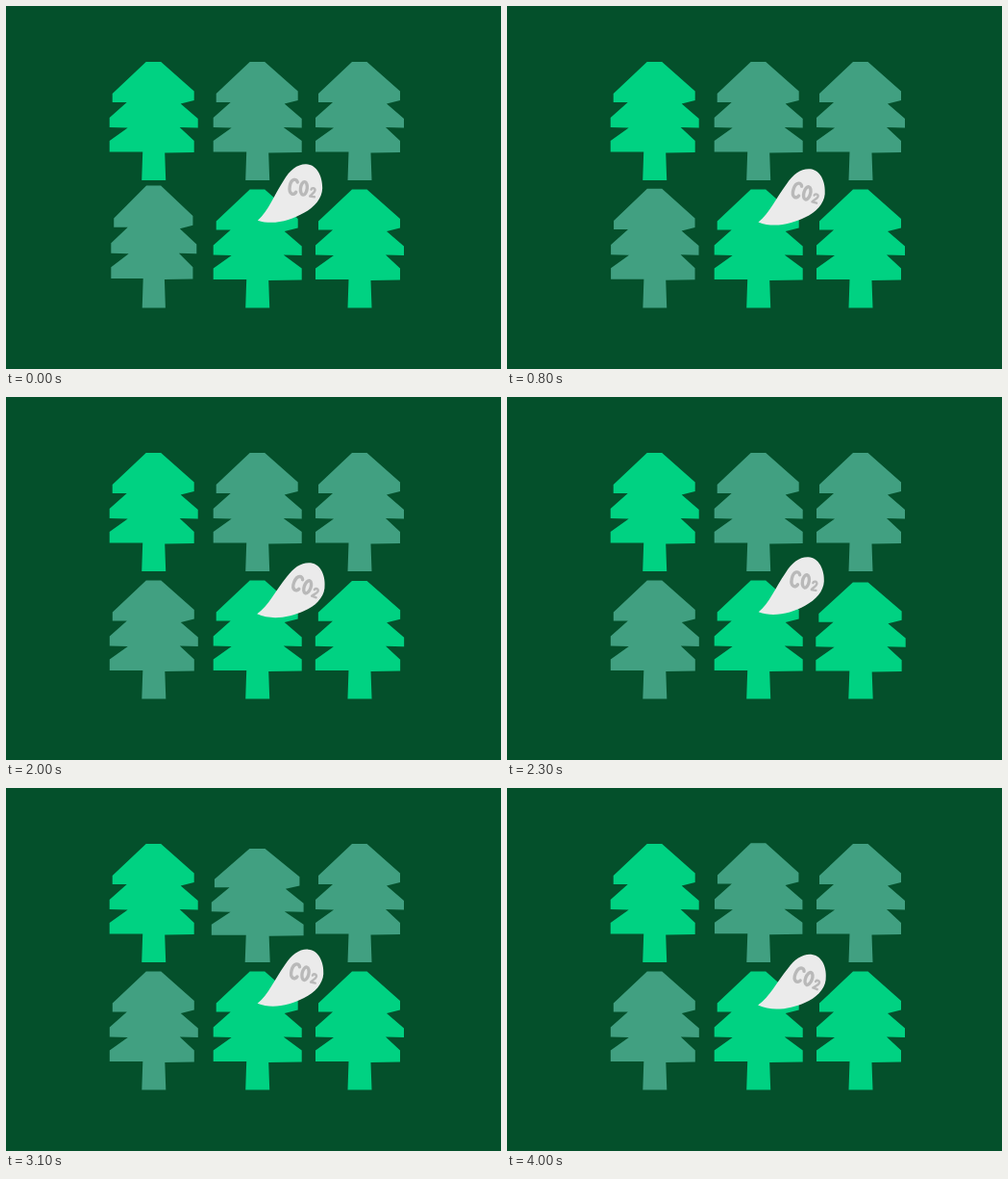
Write an HTML page that moves like this. It is 515 by 377 pixels and loops after 4.1 s.

```html
<!DOCTYPE html>
<html lang="en">
<head>
<meta charset="utf-8">
<title>Trees</title>
<style>
html, body { margin: 0; width: 100%; height: 100%; overflow: hidden; background: #04502b; }
svg { display: block; width: 100vw; height: 100vh; }
</style>
</head>
<body>
<svg viewBox="0 0 515 377">
  <g id="trees"></g>
  <path id="leaf" fill="#ebebeb" d="M262 222C273 212 278 196 288 180C294 169 302 162.5 311 162.5C322 162.5 328.5 175 328.5 187C328.5 197 321 207 310 213C296 221.5 278 227 262 222Z"/>
  <g id="label" role="img" aria-label="CO2" fill="none" stroke="#b9b9b9" stroke-width="3.4" stroke-linecap="round" stroke-linejoin="round">
    <path d="M-7.4-5.4C-8.4-9-14.6-9-14.8 0S-8.8 8.8-7.6 5"/>
    <ellipse rx="3.4" ry="6.8"/>
    <path stroke-width="2.4" d="M7.7 .2C8-2.2 12-2.2 11.8 .6C11.7 2.8 9 4.7 7.4 7.3H12.2"/>
  </g>
</svg>
<script>
const LOOP = 4100, STEP = 100, HEIGHT = 123;
const SWAY = 2400, SWAY_START = 200;
const BRIGHT = '#00d282', MUTED = '#41a081';
const $ = id => document.getElementById(id);

// Tree outline around the middle of its foot; w is the reach of the lowest branch.
const treePath = w => `M-8-123H7.5L42-92.5V-83L28-79.5L46-64V-54.5L27-55L${w}-41V-29L11.5-28.5L12.5 0H-12.5L-11.5-29.5L-46-29.5V-41L-27-54.5L-46-55V-65L-28-81L-43-81V-90Z`;

// x, foot, colour, branch reach, start of the wobble
const trees = [
  [153.7, 181, BRIGHT, 42],
  [261.7, 181, MUTED, 46, 2800],
  [368, 181, MUTED, 42],
  [153.8, 313.5, MUTED, 42, -400],
  [261.7, 313.5, BRIGHT, 46],
  [368, 313.5, BRIGHT, 42, 1200]
].map(([x, y, color, reach, start]) => {
  const el = document.createElementNS('http://www.w3.org/2000/svg', 'path');
  el.setAttribute('d', treePath(reach));
  el.setAttribute('fill', color);
  $('trees').append(el);
  return { el, x, y, start };
});

// Keys are [ms, value]: height gained by a tree, and how far the leaf hangs down
const wobble = [[0, 0], [230, -8], [470, 7], [600, 6], [950, -4.5], [1280, 1.6], [1600, 0]];
const sway = [[0, 0], [1000, 1], [1680, 1], [SWAY, 0]];

const mix = (a, b, k) => a + (b - a) * k;
const ease = k => (1 - Math.cos(Math.PI * k)) / 2;

function follow(keys, t) {
  const i = keys.findIndex(([ms]) => ms > t);
  if (i < 1) return keys[i < 0 ? keys.length - 1 : 0][1];
  const [[t0, a], [t1, b]] = [keys[i - 1], keys[i]];
  return mix(a, b, ease((t - t0) / (t1 - t0)));
}

function draw(t) {
  for (const { el, x, y, start } of trees) {
    const k = start === undefined ? 0 : follow(wobble, t - start) / HEIGHT;
    el.setAttribute('transform', `translate(${x} ${y}) scale(${1 - k} ${1 + k})`);
  }
  const s = follow(sway, (t - SWAY_START + SWAY) % SWAY);
  $('leaf').setAttribute('transform', `rotate(${7.5 * s} 234 217)`);
  $('label').setAttribute('transform',
    `translate(${mix(309, 314, s)} ${mix(187.5, 198, s)}) rotate(${mix(5, 21, s)})`);
}

const begin = performance.now();
function tick() {
  const t = (performance.now() - begin) % LOOP;
  draw(Math.floor(t / STEP) * STEP);
  requestAnimationFrame(tick);
}
tick();
</script>
</body>
</html>
```
